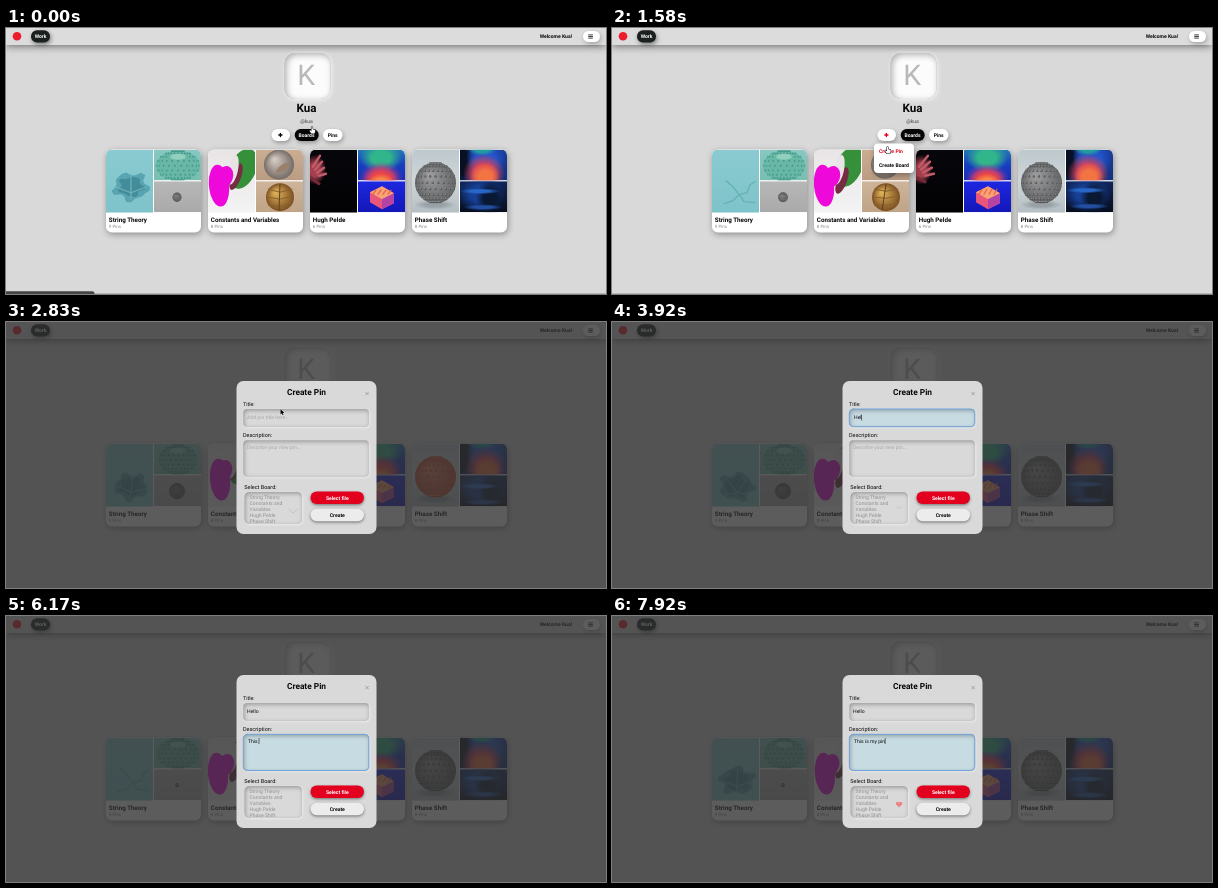
Recreate the animation shown at these times as an HTML page with a canvas. Size 600x266 px, loop 8 s.

```html
<!DOCTYPE html>
<html lang="en">
<head>
<meta charset="utf-8">
<title>Create Pin</title>
<style>
html, body { margin: 0; width: 100%; height: 100%; overflow: hidden; background: #d9d9d9; }
canvas { display: block; width: 600px; height: 266px; }
</style>
</head>
<body>
<canvas id="stage" width="600" height="266"></canvas>
<script>
const ctx = document.getElementById('stage').getContext('2d');
const LOOP = 8000, STEP = 1000 / 12, TAU = Math.PI * 2;
const RED = '#e3001f', INK = '#080808';
const USER = 'Kua', HANDLE = '@kua';
const BOARDS = [['String Theory', 9], ['Constants and Variables', 8], ['Hugh Pelde', 6], ['Phase Shift', 8]];
const OPEN_MENU = 500, OPEN_MODAL = 1660, FOCUS_TITLE = 3150, FOCUS_TEXT = 4900;

// Smooth interpolation through [time, value] pairs.
function track(t, keys) {
  if (t <= keys[0][0]) return keys[0][1];
  for (let i = 1; i < keys.length; i++) {
    const [t0, a] = keys[i - 1], [t1, b] = keys[i];
    if (t < t1) {
      const p = (t - t0) / (t1 - t0);
      return a + (b - a) * p * p * (3 - 2 * p);
    }
  }
  return keys[keys.length - 1][1];
}

function text(str, x, y, size, { weight = 400, color = INK, align = 'left' } = {}) {
  ctx.font = `${weight} ${size}px Roboto, sans-serif`;
  ctx.fillStyle = color;
  ctx.textAlign = align;
  ctx.fillText(str, x, y);
}

function shadow(color, blur, dx = 0, dy = 0) {
  ctx.shadowColor = color;
  ctx.shadowBlur = blur;
  ctx.shadowOffsetX = dx;
  ctx.shadowOffsetY = dy;
}

function box(x, y, w, h, r, fill, drop) {
  ctx.save();
  if (drop) shadow(...drop);
  ctx.fillStyle = fill;
  ctx.beginPath();
  ctx.roundRect(x, y, w, h, r);
  ctx.fill();
  ctx.restore();
}

function inset(x, y, w, h, r, ...shade) {
  ctx.save();
  ctx.beginPath();
  ctx.roundRect(x, y, w, h, r);
  ctx.clip();
  shadow(...shade);
  ctx.fillStyle = '#aaa';
  ctx.beginPath();
  ctx.rect(x - 20, y - 20, w + 40, h + 40);
  ctx.roundRect(x, y, w, h, r);
  ctx.fill('evenodd');
  ctx.restore();
}

function oval(x, y, rx, ry, fill, angle = 0) {
  ctx.fillStyle = fill;
  ctx.beginPath();
  ctx.ellipse(x, y, Math.max(0, rx), Math.max(0, ry), angle, 0, TAU);
  ctx.fill();
}

function poly(points, fill) {
  ctx.fillStyle = fill;
  ctx.beginPath();
  points.forEach(([x, y]) => ctx.lineTo(x, y));
  ctx.closePath();
  ctx.fill();
}

function line(points, color, width) {
  ctx.strokeStyle = color;
  ctx.lineWidth = width;
  ctx.lineCap = ctx.lineJoin = 'round';
  ctx.beginPath();
  points.forEach(([x, y]) => ctx.lineTo(x, y));
  ctx.stroke();
}

function gradient(x, y, w, h, ...colors) {
  const g = ctx.createLinearGradient(x, y, x, y + h);
  colors.forEach((c, i) => g.addColorStop(i / (colors.length - 1), c));
  ctx.fillStyle = g;
  ctx.fillRect(x, y, w, h);
}

// Soft patch of a six-digit hex colour that fades out at its edge.
function glow(x, y, rx, ry, color) {
  ctx.save();
  ctx.translate(x, y);
  ctx.scale(rx, ry);
  const g = ctx.createRadialGradient(0, 0, 0, 0, 0, 1);
  g.addColorStop(.45, color);
  g.addColorStop(1, color + '00');
  oval(0, 0, 1, 1, g);
  ctx.restore();
}

function ball(x, y, r, light, dark) {
  const g = ctx.createRadialGradient(x - r * .3, y - r * .35, r * .1, x, y, r);
  g.addColorStop(0, light);
  g.addColorStop(1, dark);
  oval(x, y, r, r, g);
}

// Rows of beads wrapped around a turning ball.
function beads(x, y, rx, ry, color, spin, size) {
  for (let row = -4; row <= 4; row++) {
    const lat = row * .32;
    for (let i = 0; i < 11; i++) {
      const lon = ((i + spin + (row & 1) / 2) % 11) / 11 * Math.PI - Math.PI / 2;
      oval(x + rx * Math.cos(lat) * Math.sin(lon), y + ry * Math.sin(lat),
        size * (.35 + .65 * Math.cos(lon)), size, color);
    }
  }
}

function cell(x, y, w, h, draw) {
  ctx.save();
  ctx.beginPath();
  ctx.rect(x, y, w, h);
  ctx.clip();
  ctx.translate(x, y);
  draw();
  ctx.restore();
}

function knot(x, y, size, phase) {
  const ring = (r, turn) => Array.from({ length: 24 }, (_, i) => {
    const a = i / 24 * TAU, k = r * (.85 + .13 * Math.sin(5 * a + turn) + .1 * Math.cos(7 * a - turn));
    return [x + k * Math.cos(a), y + k * .8 * Math.sin(a)];
  });
  poly(ring(size, phase), '#58a4b0');
  poly(ring(size * .7, phase + 1), '#438c9a');
  for (let i = 0; i < 4; i++) {
    const a = phase * .3 + i * 1.57;
    line([[x, y + size * .3], [x + size * .8 * Math.cos(a), y + size * .6 * Math.sin(a)]], '#6fb4bc', 1.2);
  }
}

function theoryArt(t) {
  cell(0, 0, 47, 63, () => {
    gradient(0, 0, 47, 63, '#89cbd0', '#7fc3ca');
    const turn = t % 4250;
    const size = track(turn, [[0, 20], [900, 21], [1450, 0], [2500, 0], [2780, 19], [4250, 20]]);
    if (turn > 1400 && turn < 2550) {
      const color = '#62b1b3';
      line([[14, 31], [21, 37], [27, 45], [35, 43], [38, 35], [43, 32]], color, 1.3);
      line([[27, 45], [21, 51], [12, 54]], color, 1.3);
      line([[28, 46], [32, 52], [43, 53]], color, 1.3);
    }
    if (size > .5) knot(25, track(turn, [[0, 37], [2500, 43]]), size, t / 500);
  });
  cell(48, 0, 47, 30.5, () => {
    gradient(0, 0, 47, 31, '#87c8c2', '#78beb0');
    const wide = track(t % 2250, [[0, 22], [580, 19], [1580, 21], [2250, 22]]);
    oval(24, 16, wide, 15, '#69b8a7');
    beads(24, 16, wide, 15, '#459988', t / 400, 1);
    oval(24, 7, 8, 3, '#91d0bd');
  });
  cell(48, 31.5, 47, 31, () => {
    gradient(0, 0, 47, 31, '#b7b7b7', '#aaa');
    const r = track(t, [[0, 4.6], [580, 2.6], [1580, 5], [2830, 8], [3920, 8], [5500, 2]]);
    ball(23, 16, r, '#8a8a8a', '#636363');
    beads(23, 16, r * .9, r * .9, '#5a5a5a', t / 500, r * .09);
  });
}

function variablesArt(t) {
  const sway = Math.sin(t / 2250 * TAU);
  cell(0, 0, 47, 63, () => {
    gradient(0, 0, 47, 63, '#e9e5e7', '#f3f3f3');
    oval(35, 19 + sway * 2, 13, 21, '#369039', .4);
    oval(28, 27 - sway * 4, 5, 14, '#762c43', .35);
    oval(25, 20, 5, 15, '#e8e3e5', .2);
    oval(11 + sway, 36, 10, 21, '#ee08da', -.1);
    oval(17 - sway, 27, 8, 11, '#ee08da', .3);
  });
  cell(48, 0, 47, 30.5, () => {
    gradient(0, 0, 47, 31, '#cbad92', '#b99c82');
    ball(23, 15, 15 + sway, '#d2c6bd', '#756c67');
    oval(27, 18, 8, 3, '#9a806b', -.6);
  });
  cell(48, 31.5, 47, 31, () => {
    gradient(0, 0, 47, 31, '#ceb49a', '#c0a487');
    ball(24, 16, 14, '#dbae56', '#7b5023');
    for (let i = -1; i < 2; i++) line([[12, 16 + i * 8], [24, 18 + i * 7 + sway], [36, 15 + i * 7]], '#8a602d', 1);
    line([[24, 3], [23 + sway * 3, 29]], '#5d4222', 1);
  });
}

function handArt(t) {
  const sway = Math.sin(t / 2250 * TAU);
  cell(0, 0, 47, 63, () => {
    gradient(0, 0, 47, 63, '#07070b', '#020205');
    glow(5, 20, 11, 15, '#a53f4d');
    for (let i = 0; i < 4; i++) line([[3 + i * 2, 17 + i * 3], [10 + i * 2 - sway * 2, 6 + i * 6]], '#c05c69', 2.5);
    line([[0, 28], [9, 34 + sway * 2]], '#752936', 3);
  });
  cell(48, 0, 47, 30.5, () => {
    gradient(0, 0, 47, 31, '#2379b3', '#173dc0', '#162db7');
    glow(23, 8, 21, 15, '#31b58b');
    glow(23, 29, 22, 17 + sway * 2, '#b43b8b');
    glow(23, 31, 18, 15 + sway * 2, '#ee4540');
    glow(23, 33, 13, 9, '#f4894b');
  });
  cell(48, 31.5, 47, 31, () => {
    gradient(0, 0, 47, 31, '#1d27df', '#1318b9');
    poly([[12, 11], [24, 5], [36, 12], [36, 22], [24, 28], [12, 21]], '#e9557b');
    poly([[12, 11], [24, 5], [36, 12], [24, 18]], '#f6a375');
    poly([[24, 18], [36, 12], [36, 22], [24, 28]], '#b443a6');
    for (let i = 0; i < 4; i++) line([[15 + i * 5, 13], [18 + i * 5, 9 + sway]], '#f45b49', 1.2);
  });
}

function shiftArt(t) {
  const phase = t % 2250, warm = phase > 300 && phase < 950;
  const sway = Math.sin(t / 2250 * TAU);
  cell(0, 0, 47, 63, () => {
    gradient(0, 0, 47, 63, '#bdc8cd', '#d0d6d8', '#b4bec3');
    glow(23, 55, 21, 5, '#98a2a6');
    ball(23.5, 33, 20.5, warm ? '#ec8262' : '#9b9b9c', warm ? '#c24e38' : '#646566');
    beads(23.5, 33, 20, 20, warm ? '#bd4935' : '#58595b', t / 350, 1.3);
    beads(23, 32.5, 20, 20, warm ? '#f39471' : '#97989a', t / 350, .65);
  });
  cell(48, 0, 47, 30.5, () => {
    gradient(0, 0, 47, 31, '#1a3f9c', '#12307c');
    glow(2, 12, 12, 28, '#081024');
    glow(26, 10, 20, 18, '#2355cd');
    glow(24 + sway * 2, 24, 21, 20, '#d94157');
    glow(25 + sway * 2, 27, 15, 14, '#f27443');
    glow(22, 0, 14, 6, '#229d9d');
  });
  cell(48, 31.5, 47, 31, () => {
    gradient(0, 0, 47, 31, '#10265c', '#060d1e');
    glow(21, 13, 24, 18, '#173f94');
    glow(30 + sway * 2, 17, 14, 18, '#091833');
    glow(20, 10 + sway, 20, 3, '#2867c8');
    glow(23, 26 + sway, 20, 3, '#234ea2');
  });
}

const ART = [theoryArt, variablesArt, handArt, shiftArt];

function drawHeader() {
  box(0, -10, 600, 27, 0, '#dcdcdc', ['rgba(0,0,0,.55)', 8, 0, 1]);
  oval(11, 8.3, 4.3, 4.3, '#ed1c2b');
  box(25, 2.3, 19, 12.2, 6, '#1b1f1e', ['rgba(0,0,0,.45)', 4, 1, 2]);
  text('Work', 34.5, 10.3, 5.05, { weight: 700, color: '#fff', align: 'center' });
  text(`Welcome ${USER}!`, 566, 10.2, 5.05, { weight: 700, align: 'right' });
  box(577, 3, 17, 11, 5.5, '#fff', ['rgba(0,0,0,.25)', 4, 1, 2]);
  for (let i = 0; i < 3; i++) line([[582.5, 6.9 + i * 1.6], [586.5, 6.9 + i * 1.6]], '#111', .8);
}

function drawProfile(t) {
  box(278.5, 25, 46, 46, 10, '#fcfcfc', ['rgba(255,255,255,.7)', 5, 1, 1]);
  inset(278.5, 25, 46, 46, 10, 'rgba(0,0,0,.3)', 6, 2, 2);
  text(USER[0], 300.3, 57.3, 28.5, { color: '#b9b9b9', align: 'center' });
  text(USER, 300.5, 84.3, 11.6, { weight: 700, align: 'center' });
  text(HANDLE, 300.5, 95.2, 5.1, { color: '#444', align: 'center' });

  const drop = ['rgba(0,0,0,.3)', 4, 1, 2];
  const pressed = t >= OPEN_MENU && t < 750;
  box(265.5, 101, 18.5, 12, 6, pressed ? '#cfcfcf' : '#fff', drop);
  if (pressed) inset(265.5, 101, 18.5, 12, 6, 'rgba(0,0,0,.45)', 3, 1, 1);
  const plus = t > 400 ? RED : INK;
  line([[272.8, 107], [276, 107]], plus, 1.3);
  line([[274.4, 105.4], [274.4, 108.6]], plus, 1.3);
  box(288.7, 101, 24, 12, 6, '#050505', drop);
  text('Boards', 300.5, 108.9, 5.05, { weight: 700, color: '#fff', align: 'center' });
  box(317, 101, 19.5, 12, 6, '#fff', drop);
  text('Pins', 326.7, 108.9, 5.05, { weight: 700, align: 'center' });
}

function drawBoards(t) {
  BOARDS.forEach(([title, pins], i) => {
    const x = 100 + i * 102;
    box(x, 121.5, 95, 83, 6, '#fff', ['rgba(0,0,0,.35)', 6, 1, 2]);
    ctx.save();
    ctx.beginPath();
    ctx.roundRect(x, 121.5, 95, 83, 6);
    ctx.clip();
    ctx.translate(x, 121.7);
    ART[i](t);
    ctx.restore();
    text(title, x + 2.8, 193.8, 6.25, { weight: 700 });
    text(`${pins} Pins`, x + 2.8, 200.2, 4.45, { color: '#888' });
  });
}

function drawMenu(t) {
  box(262, 115.5, 40, 29.5, 4, '#fff', ['rgba(0,0,0,.35)', 6, 1, 2]);
  text('Create Pin', 267, 125, 5.1, { weight: 700, color: t > 1000 ? RED : INK });
  text('Create Board', 267, 139.2, 5.1, { weight: 700 });
}

function drawField(y, h, focused, value, placeholder, t) {
  const x = 237.3, w = 125.5;
  box(x, y, w, h, 4, focused ? '#c7dbe2' : '#d9d9d9', ['rgba(255,255,255,.5)', 3, 1, 1]);
  inset(x, y, w, h, 4, 'rgba(0,0,0,.3)', 4, 1, 1.5);
  if (focused) {
    ctx.strokeStyle = '#6fa3dc';
    ctx.lineWidth = 1;
    ctx.beginPath();
    ctx.roundRect(x, y, w, h, 4);
    ctx.stroke();
  }
  const left = focused ? 242 : 241, base = y + (h < 25 ? 10.2 : 8.5);
  text(value || placeholder, left, base, 5.1, { color: value ? INK : '#a8a8a8' });
  if (focused && (value || t % 1000 < 500)) {
    const end = left + (value ? ctx.measureText(value).width : 0);
    line([[end, base - 4.4], [end, base + .9]], '#000', .55);
  }
}

function drawSelectIcon(t) {
  if (t < 5500) {
    const p = .5 + .5 * Math.cos((t - 2830) / 2180 * TAU);
    const y = 185.6 + p * 3.4, half = 2 + p * 2;
    line([[287 - half, y - half * .45], [287, y + half * .55], [287 + half, y - half * .45]], '#bcbcbc', .8);
  } else if (t > 7100) {
    ctx.save();
    ctx.globalAlpha = track(t, [[7100, 0], [7700, .85]]);
    oval(285.6, 187.4, 1.8, 1.7, '#ee7779');
    oval(288.6, 187.4, 1.8, 1.7, '#ee7779');
    poly([[284, 188.2], [290.2, 188.2], [287.1, 191.4]], '#ee7779');
    ctx.restore();
  }
}

function drawModal(t) {
  ctx.fillStyle = 'rgba(47,47,47,.78)';
  ctx.fillRect(0, 0, 600, 266);
  box(230.5, 59, 140, 153, 7, '#d9d9d9');
  text('Create Pin', 300.5, 73.2, 8.35, { weight: 600, align: 'center' });
  line([[359.8, 70.3], [362.4, 72.9]], '#888', .65);
  line([[362.4, 70.3], [359.8, 72.9]], '#888', .65);

  const typed = (str, start, pace) => str.slice(0, Math.max(0, Math.floor((t - start) / pace)));
  text('Title:', 237, 84, 5.3);
  drawField(87, 17.7, t >= FOCUS_TITLE && t < FOCUS_TEXT, typed('Hello', 3580, 110), 'Add pin title here...', t);
  text('Description:', 237, 114.9, 5.5);
  drawField(118.3, 36.2, t >= FOCUS_TEXT, typed('This is my pin', 5350, 160), 'Describe your new pin...', t);

  text('Select Board:', 238.3, 167.2, 5.5);
  box(238.5, 170, 57.5, 32, 5, '#d9d9d9', ['rgba(255,255,255,.5)', 3, 1, 1]);
  inset(238.5, 170, 57.5, 32, 5, 'rgba(0,0,0,.3)', 4, 1, 1.5);
  const options = BOARDS.flatMap(([name]) => name.length > 20 ? name.split(/ (?=V)/) : [name]);
  options.forEach((name, i) => text(name, 243.5, 177.2 + i * 5.85, 5.1, { color: '#929292' }));
  drawSelectIcon(t);

  const drop = ['rgba(0,0,0,.45)', 3, 0, 1.3];
  box(304.5, 169.5, 53.5, 12.5, 6.2, RED, drop);
  text('Select file', 331.3, 177.6, 5.1, { weight: 700, color: '#fff', align: 'center' });
  box(304.5, 186.7, 53.5, 12.5, 6.2, '#ececec', drop);
  text('Create', 331.3, 194.7, 5.1, { weight: 700, align: 'center' });
}

function drawCursor(t) {
  const typing = t > 3650 && t < 4580 || t > 5400;
  if (typing) return;
  const x = track(t, [[0, 305.5], [420, 272], [750, 272], [1050, 275], [2500, 275], [2800, 274.5]]);
  const y = track(t, [[0, 99], [420, 106.5], [750, 106.5], [1050, 119], [2400, 119], [2800, 86.5],
    [3000, 93], [4580, 93], [4880, 128]]);
  ctx.save();
  ctx.translate(x, y);
  if (t < OPEN_MODAL) {
    const hand = [[0, 0], [1, 0], [1.2, 2.3], [3.6, 3], [3.6, 5], [2.8, 6.5], [-.2, 6.5], [-2, 3.8], [-1.2, 3.3], [0, 4.2]];
    line([...hand, hand[0]], '#111', 1.1);
    poly(hand, '#fff');
  } else if (t < 3000) {
    const arrow = [[0, 0], [0, 5.4], [1.3, 4.3], [2.2, 6.2], [3, 5.8], [2.2, 4], [3.8, 3.9]];
    line([...arrow, arrow[0]], '#eee', .8);
    poly(arrow, '#000');
  } else {
    line([[0, 0], [0, 6]], '#222', .7);
    line([[-1, 0], [1, 0]], '#222', .6);
    line([[-1, 6], [1, 6]], '#222', .6);
  }
  ctx.restore();
}

function render(now) {
  const t = Math.floor((now % LOOP + 5) / STEP) * STEP;
  const modal = t >= OPEN_MODAL;
  ctx.textRendering = 'geometricPrecision';
  ctx.fillStyle = '#d9d9d9';
  ctx.fillRect(0, 0, 600, 266);
  drawHeader();
  drawProfile(t);
  drawBoards(t);
  if (t >= OPEN_MENU && !modal) drawMenu(t);
  if (modal) drawModal(t);
  else {
    box(0, 265, 600, 1, 0, '#b5b5b5');
    if (t < 1000) box(0, 263.3, 88.5, 4, [0, 2, 0, 0], '#454545');
  }
  drawCursor(t);
}

const start = performance.now();
function tick() {
  render(performance.now() - start);
  requestAnimationFrame(tick);
}
tick();
</script>
</body>
</html>
```
